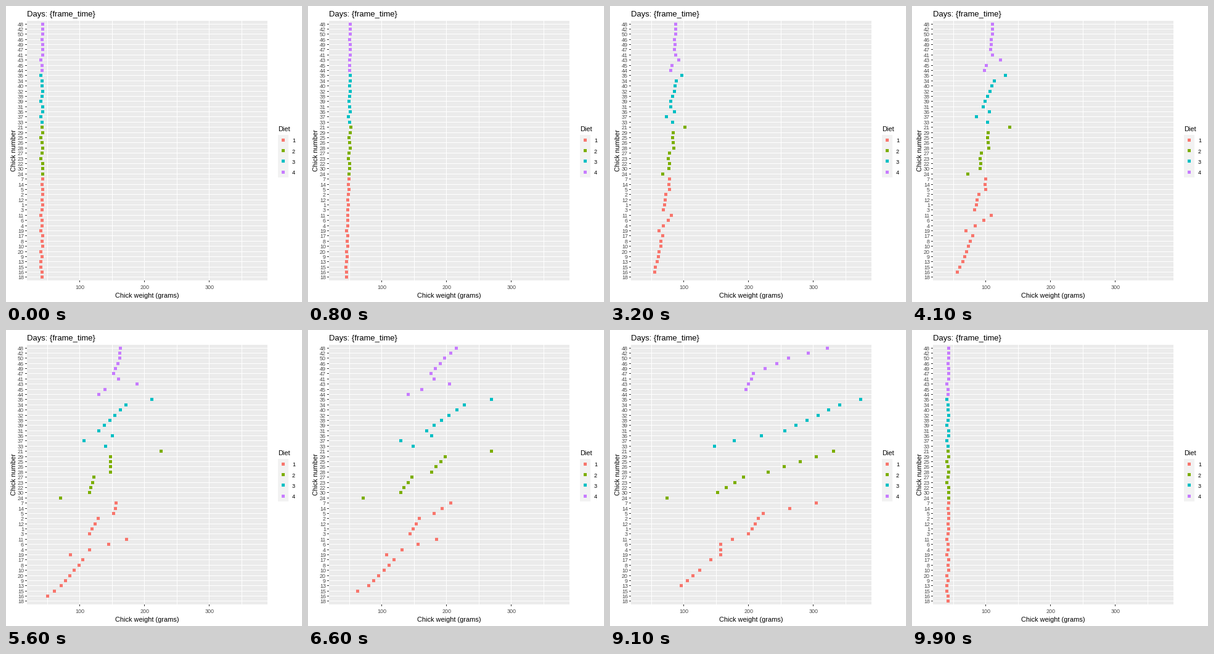
Write a matplotlib script that moves like this. It is 480 px wide and 480 px high and loops after 10000 ms.

```python
import numpy as np
import matplotlib.pyplot as plt
from matplotlib.animation import FuncAnimation
from matplotlib.patches import Rectangle

SIZE, DPI = 480, 72
FRAMES, INTERVAL = 100, 100
LEFT, RIGHT, TOP, BOTTOM = 34, 424, 24, 445
X_MIN, X_MAX = 18.1, 389.9
COLORS = ["#F8766D", "#7CAE00", "#00BFC4", "#C77CFF"]

# Days on which a state is held, and the frame where each move starts.
DAYS = np.array([0, 2, 4, 6, 8, 10, 12, 14, 16, 18, 20, 21])
STARTS = [5, 14, 23, 32, 41, 49, 56, 64, 72, 80, 88, 96]
STEPS = [3 if s == 49 else 4 for s in STARTS]

# Each diet from top to bottom: chick names, early gain in grams, and key
# ranks (rank, weight on day 12, weight on day 21) with the rest in between.
DIETS = [
    ("48 42 50 46 49 47 41 43 45 44", 20,
     [(0, 155, 322), (2, 155, 262), (5, 148, 207), (6, 155, 204),
      (7, 184, 200), (8, 135, 196), (9, 127, 150)]),
    ("35 34 40 32 38 39 31 36 37 33", 20,
     [(0, 201, 373), (1, 162, 341), (6, 123, 256), (7, 145, 220),
      (8, 103, 178), (9, 137, 147)]),
    ("21 29 25 26 28 27 23 22 30 24", 20,
     [(0, 217, 331), (1, 140, 305), (4, 142, 230), (5, 118, 192),
      (8, 112, 152), (9, 70, 74)]),
    ("7 14 5 2 12 1 3 11 6 4 19 17 8 10 20 9 13 15 16 18", 12,
     [(0, 148, 305), (2, 147, 223), (3, 123, 215), (6, 110, 200),
      (7, 168, 175), (8, 141, 157), (10, 82, 157), (11, 102, 142),
      (16, 70, 96), (19, 40, 40)]),
]
LAST_DAY = {"44": 18, "8": 20, "15": 14, "16": 12, "18": 2}


def hermite(xs, ys, t):
    """Smooth cubic curve through a few points."""
    slope = np.gradient(ys, xs)
    i = np.clip(np.searchsorted(xs, t, "right") - 1, 0, len(xs) - 2)
    h = xs[i + 1] - xs[i]
    u = (t - xs[i]) / h
    return (ys[i] * (1 + 2 * u) * (1 - u) ** 2
            + ys[i + 1] * u ** 2 * (3 - 2 * u)
            + h * slope[i] * u * (1 - u) ** 2
            - h * slope[i + 1] * u ** 2 * (1 - u))


def growth(chick, hatch, early, middle, final):
    """Weight on every day of DAYS, NaN once the chick has dropped out."""
    gain = middle - hatch
    keys = np.array([hatch,
                     hatch + 0.6 * early + 0.08 * gain,
                     hatch + early + 0.37 * gain,
                     middle, final])
    curve = np.round(hermite(np.array([0, 4, 8, 12, 21]), keys, DAYS))
    curve[DAYS > LAST_DAY.get(chick, 21)] = np.nan
    return curve


def weights_at(frame):
    k = int(np.searchsorted(STARTS, frame, "right")) - 1
    if k < 0:
        return WEIGHTS[:, 0]
    a, b = WEIGHTS[:, k], WEIGHTS[:, (k + 1) % len(DAYS)]
    p = (frame - STARTS[k] + 1) / STEPS[k]
    if p >= 1:
        return b
    # Leaving points wait for the end of the move; new ones appear there.
    return np.where(np.isnan(b), a, a + (b - a) * p)


def px(grams):
    return LEFT + (grams - X_MIN) / (X_MAX - X_MIN) * (RIGHT - LEFT)


def mid(v):
    """Centre of the pixel that holds v."""
    return np.floor(v) + 0.5


def box(x, y, w, h, color):
    ax.add_patch(Rectangle((x, y), w, h, fc=color, ec="none",
                           antialiased=False, zorder=0))


def dots(x, y, colors):
    return ax.scatter(mid(x), mid(y), s=4.4 ** 2, c=colors, linewidths=0,
                      antialiaseds=False, zorder=3)


rng = np.random.default_rng(4)
chicks, rows, tints = [], [], []
for (names, early, keys), color in zip(DIETS, COLORS[::-1]):
    ranks, middles, finals = zip(*keys)
    for rank, chick in enumerate(names.split()):
        chicks.append(chick)
        rows.append(growth(chick, rng.integers(40, 43), early,
                           np.interp(rank, ranks, middles),
                           np.interp(rank, ranks, finals)))
        tints.append(color)
WEIGHTS = np.array(rows)
PITCH = (BOTTOM - TOP) / (len(chicks) + 0.2)
Y = TOP + PITCH * (0.6 + np.arange(len(chicks)))

plt.rcParams["font.family"] = "Liberation Sans"
fig = plt.figure(figsize=(SIZE / DPI, SIZE / DPI), dpi=DPI, facecolor="white")
ax = fig.add_axes([0, 0, 1, 1])
ax.set_xlim(0, SIZE)
ax.set_ylim(SIZE, 0)
ax.axis("off")

# Panel, grid and ticks
box(LEFT, TOP, RIGHT - LEFT, BOTTOM - TOP, "#EBEBEB")
thin = dict(lw=1, antialiaseds=False, snap=False, zorder=1)
ax.vlines(mid(px(np.arange(50, 351, 50))), TOP, BOTTOM, color="white", **thin)
ax.hlines(mid(Y), LEFT, RIGHT, color="white", **thin)
ax.hlines(mid(Y), LEFT - 3, LEFT, color="#333333", **thin)
majors = np.array([100, 200, 300])
ax.vlines(mid(px(majors)), BOTTOM, BOTTOM + 3, color="#333333", **thin)

small = dict(fontsize=9, color="#4D4D4D")
for y, chick in zip(Y, chicks):
    ax.text(LEFT - 5, np.floor(y) + 4, chick, ha="right", **small)
for grams in majors:
    ax.text(px(grams), 459, str(grams), ha="center", **small)

ax.text(LEFT, 17, "Days: {frame_time}", fontsize=13)
ax.text((LEFT + RIGHT) / 2, 473, "Chick weight (grams)", fontsize=11,
        ha="center")
ax.text(16, (TOP + BOTTOM) / 2, "Chick number", fontsize=11, rotation=90,
        ha="center", va="baseline", rotation_mode="anchor")

# Legend
KEY = 17.28
ax.text(441, 203, "Diet", fontsize=11)
box(441, 209, 17, 69, "#F2F2F2")
key_y = 208.7 + KEY * (0.5 + np.arange(4))
dots(np.full(4, 449.4), key_y, COLORS)
for n, y in enumerate(key_y, 1):
    ax.text(464, round(y) + 4, str(n), fontsize=9)

points = dots(px(WEIGHTS[:, 0]), Y, tints)


def update(frame):
    points.set_offsets(np.column_stack([mid(px(weights_at(frame))), mid(Y)]))
    return [points]


anim = FuncAnimation(fig, update, frames=FRAMES, interval=INTERVAL,
                     repeat=True, repeat_delay=0)
plt.show()
```
